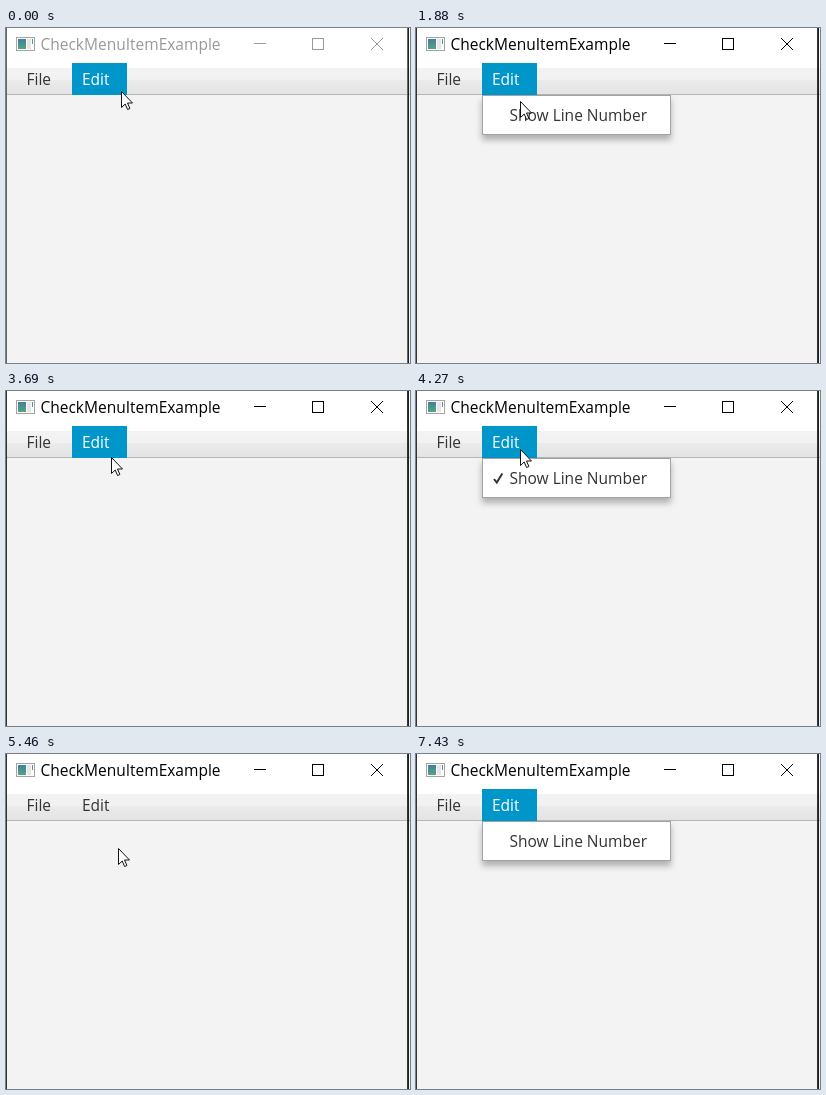
Animation, 404 px wide and 335 px high, one loop 7710 ms. Source, as an HTML page:

```html
<!DOCTYPE html>
<html lang="en">
<head>
<meta charset="utf-8">
<title>CheckMenuItemExample</title>
<style>
  html, body { margin: 0; width: 100%; height: 100%; overflow: hidden; background: #f3f3f3; }
  svg { display: block; width: 404px; height: 335px; }
  text { font: 15.5px "Open Sans", "Noto Sans", sans-serif; fill: currentColor; }
  .label { color: #333; }
  .line { fill: none; stroke: currentColor; }
  .crisp { shape-rendering: crispEdges; }

  .caption, .edge, .edit, .popup, .item, .tick, .cursor {
    animation: 7710ms step-end infinite;
  }
  .caption { animation-name: caption; }
  .edge { animation-name: edge; }
  .edit { animation-name: edit; }
  .popup { animation-name: popup; }
  .item { animation-name: item; }
  .tick { animation-name: tick; }
  .cursor { animation-name: cursor; }
  .panel { fill: #fff; stroke: #a3a3a3; filter: drop-shadow(0 5px 3px rgba(0, 0, 0, .28)); }
  .row { fill: var(--row); }

  /* window gains focus */
  @keyframes caption { 0% { color: #999; } 15.953%, 100% { color: #000; } }
  @keyframes edge { 0% { fill: #666; } 15.953%, 100% { fill: #333; } }

  /* menu button highlight */
  @keyframes edit {
    0%, 47.859%, 77.821%, 100% { color: #fff; fill: #0096c9; }
    36.705%, 70.817% { color: #333; fill: transparent; }
  }
  @keyframes popup {
    0%, 36.705%, 70.817% { visibility: hidden; }
    17.509%, 55.382%, 83.268%, 100% { visibility: visible; }
  }
  @keyframes item {
    0%, 36.705%, 70.817%, 100% { color: #333; --row: transparent; }
    26.329%, 60.570% { color: #fff; --row: #0096c9; }
  }
  @keyframes tick {
    0%, 70.817%, 100% { opacity: 0; }
    36.705% { opacity: 1; }
  }

  @keyframes cursor {
    0% { transform: translate(115px, 63px); opacity: 1; }
    1.945% { transform: translate(112px, 60px); }
    3.501% { transform: translate(107px, 57px); }
    5.058% { transform: translate(104px, 56px); }
    24.383% { transform: translate(104px, 73px); }
    26.329% { transform: translate(105px, 88px); }
    29.571% { transform: translate(106px, 89px); }
    31.517% { transform: translate(106px, 90px); }
    43.968% { transform: translate(106px, 85px); }
    45.914% { transform: translate(106px, 73px); }
    47.859% { transform: translate(105px, 66px); }
    49.805% { transform: translate(104px, 58px); }
    59.014% { transform: translate(104px, 68px); }
    60.570% { transform: translate(105px, 82px); }
    62.127% { transform: translate(106px, 91px); }
    64.072% { transform: translate(110px, 93px); }
    65.629% { transform: translate(112px, 94px); }
    74.319% { transform: translate(114px, 88px); }
    75.875% { transform: translate(114px, 79px); }
    77.821% { transform: translate(108px, 62px); }
    79.377% { transform: translate(104px, 55px); }
    87.289% { transform: translate(116px, 54px); }
    88.845% { transform: translate(140px, 53px); }
    90.791% { transform: translate(325px, 79px); opacity: 1; }
    92.866% { transform: translate(325px, 79px); opacity: 0; }
    94.811% { transform: translate(66px, 179px); opacity: 1; }
    96.368%, 100% { transform: translate(66px, 179px); opacity: 0; }
  }
</style>
</head>
<body>
<svg viewBox="0 0 404 335">
  <defs>
    <linearGradient id="bar" x2="0" y2="1">
      <stop offset="0" stop-color="#f3f3f3"/>
      <stop offset=".45" stop-color="#f1f1f1"/>
      <stop offset=".47" stop-color="#ebebeb"/>
      <stop offset="1" stop-color="#e4e4e4"/>
    </linearGradient>
    <linearGradient id="pane" x2="0" y2="1">
      <stop offset="0" stop-color="#3f7fa0"/>
      <stop offset="1" stop-color="#56a57c"/>
    </linearGradient>
  </defs>

  <!-- window -->
  <rect width="404" height="335" fill="#f3f3f3"/>
  <rect width="404" height="40" fill="#fff"/>
  <rect y="40" width="404" height="26" fill="url(#bar)"/>
  <rect y="66" width="404" height="1" fill="#b6b6b6"/>
  <rect class="edge" width="1" height="335"/>
  <rect class="edge" x="401" width="1" height="335"/>
  <rect x="402" width="1" height="335" fill="#222"/>

  <!-- window icon -->
  <rect x="10.5" y="9.5" width="18" height="13" fill="#fff" stroke="#a4a4a4"/>
  <rect x="12" y="11" width="8" height="10" fill="url(#pane)"/>
  <rect x="21" y="11" width="4" height="10" fill="#e6e6e6"/>
  <rect x="26" y="11" width="1" height="5" fill="#5b8fa8"/>

  <!-- title bar -->
  <g class="caption">
    <text x="34.5" y="22">CheckMenuItemExample</text>
    <path class="line crisp" d="M248 15.5h12M306.5 10.5h11v11h-11z"/>
    <path class="line" d="M365 10l12 12M377 10l-12 12"/>
  </g>

  <!-- menu bar -->
  <text class="label" x="20.5" y="57">File</text>
  <g class="edit">
    <rect x="66" y="35" width="55" height="32"/>
    <text x="76" y="57">Edit</text>
  </g>

  <!-- drop-down -->
  <g class="popup">
    <rect class="panel" x="66.5" y="67.5" width="188" height="39"/>
    <g class="item">
      <rect class="row" x="68" y="72" width="185" height="30"/>
      <path class="line tick" d="M78 88l2.8 3.6L86.3 82.5" stroke-width="2"/>
      <text x="93.5" y="93">Show Line Number</text>
    </g>
  </g>

  <path class="cursor" d="M.5 .5v16l3.7-3.5 2.4 5.5 2.3-1L6.500 12H11.500z" fill="#fff" stroke="#111"/>
</svg>
</body>
</html>
```
